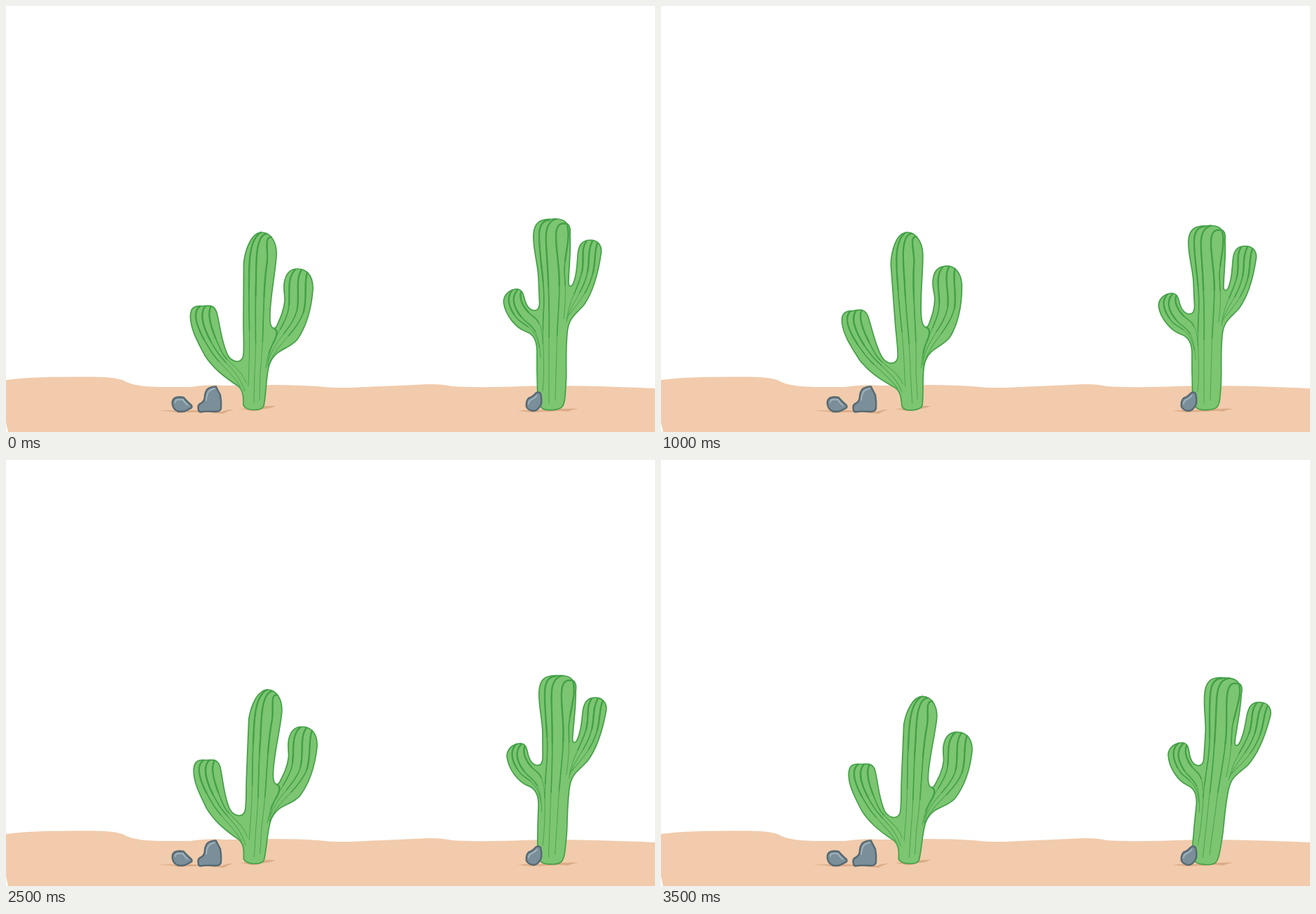
Recreate the animation shown at these times as an HTML page. Size 924 by 606 pixels, loop 4 s.

```html
<!DOCTYPE html>
<html lang="en">
<head>
<meta charset="utf-8">
<title>Desert cacti</title>
<style>
html, body { margin: 0; width: 100%; height: 100%; overflow: hidden; background: #fff; }
svg { display: block; width: 100%; height: 100%; }
.skin { fill: #7cc571; stroke: #43a047; stroke-width: 1.7; stroke-linejoin: round; }
.rib { fill: none; stroke: #43a047; stroke-linecap: round; }
.rock { fill: #7b8f9a; stroke: #566971; stroke-width: 2.4; stroke-linejoin: round; }
.shine { fill: none; stroke: #a9bbc3; stroke-width: 1.5; stroke-linecap: round; }
.shade { fill: #dcab87; }
</style>
</head>
<body>
<svg viewBox="0 0 924 606" preserveAspectRatio="none">
  <path fill="#f1cbac" d="M0 532C30 528 70 527.5 110 527.5C140 527.5 155 528 168 533C180 540 200 542.5 240 542L262 542Q290 538 310 540L380 539Q420 539 450 541.5Q470 544 500 542.5Q560 540 600 538Q620 537.5 635 541Q660 543 720 541.5Q770 539.5 820 540.5Q870 541.5 924 544V606H3L0 592Z"/>
  <path class="shade" d="M216 576Q232 574.5 246 576Q262 574 276 576Q296 575 308 577Q314 574 324 574Q316 576 310 580Q298 579 288 578Q264 577 246 579Q236 576 216 576Z"/>
  <path class="shade" d="M331 573Q345 572 356 573Q368 568 384 569Q376 573 364 573.5Q358 577 348 576Q342 574 331 573Z"/>
  <path class="shade" d="M728 576Q744 574 760 575Q782 572 796 573Q804 572 815 573Q806 574 800 577Q790 575 778 577Q762 577 748 578Q740 577 728 576Z"/>
  <g id="left"></g>
  <g id="right"></g>
  <path class="rock" d="M237 567Q236 559 242 557Q247 555.5 253 557Q256 561 264 568Q266 572 261 573Q255 577.5 249 577Q239 577 237 567Z"/>
  <path class="shine" d="M241 564Q241 560 245 560L252 560Q255 565 259 568"/>
  <path class="rock" d="M274 575Q272 567 278 565Q283 562 283 555Q284 546 289 543.5Q295 541 299 541.5Q302 548 305 553Q307 563 306 573Q304 577.5 297 577Q285 576 277 577.5Q275 577.5 274 575Z"/>
  <path class="shine" d="M285 561Q286 550 290 547L297 544"/>
  <path class="rock" d="M741 570Q740 562 744 558Q750 556 754 551Q758 548 761 551Q763 558 762 566Q758 575 752 576Q744 576 741 570Z"/>
  <path class="shine" d="M744 566Q744 562 748 560Q753 558 756 554"/>
</svg>
<script>
const STEP = 500;

const cacti = {
  left: {
    outline: 'M338 568C338 556 338 548 331 541C308 526 294 514 283 497C272 476 262.5 459 262.5 441C263 429 268 426 280 427C292 425 297 427 300 436C305 455 307 480 316 497C322 507 334 509 337.5 499C339.5 490 338 470 338 450L338.5 365C341 345 350 322 364 322C378 322 386 338 385 355C383 385 374 425 376 448C377 460 383 461 386 454C391 443 396 432 397 418C397 410 395 405 396 395C398 380 405 374 415 374C428 374 437 383 437 402C435 430 428 455 415 474C402 490 384 486 375 510C370 525 371 548 367 569Q365 574.5 353 574.5Q341 574.5 338 568Z',
    ribs: [
      'M363 322C346 332 346 365 346 395C345 430 348 470 346 510L345 540',
      'M371 324C356 326 356 360 356 390C354 440 357 480 354 520L353 565',
      'M378 329C366 328 375 350 371 370C365 410 368 470 362 520L361 560',
      'M276 427C262 438 276 466 290 488C302 508 322 522 334 542',
      'M284 427C272 440 286 470 300 491C312 510 330 518 340 548',
      'M292 427C284 440 296 468 306 490C314 508 334 514 342 536',
      'M412 375C398 388 406 412 402 432C398 455 379 470 373 505',
      'M421 375C411 390 419 412 414 434C406 462 379 476 372 512',
      'M429 379C424 392 429 412 424 434C414 466 386 478 373 512',
      'M382 459C389 462 384 474 379 482C374 492 372 500 370 515'
    ]
  },
  right: {
    outline: 'M762 571C755 560 757 540 756 520L756 490C755.5 474 750 466 740 463C726 458 711 440 708.5 422C708 412 715 404 727 402.5C734 403 736 408 737.5 414C740 425 745 432 751 433C758 434 760 428 759.5 420L758 385C757 365 750 345 751 325C752 308 760 303 778 303C788 302 795 305 798 309C803 311 804 316 803 325C804.5 350 801 375 801 393C801 399.5 804 400 807 396C812 385 813 370 814 355C815 340 820 333 832 333C843 333 848 341 847.5 350C844 375 837 405 823 425C810 440 801 443 799 465C796 500 799 520 797 540C796 560 795 567 791 571Q785 575 775 574.5Q766 575 762 571Z',
    ribs: [
      'M774 304C755 306 759 330 760 345C762 375 768 400 765 440C763 480 768 510 764 548',
      'M783 303C764 308 769 335 770 355C773 400 774 440 773 480L773 565',
      'M798 310C776 304 784 340 786 365C791 405 784 450 784 490L782 560',
      'M799 312C804 330 796 350 795 375C796 400 798 410 794 445',
      'M721 404C710 416 718 434 730 447C742 456 755 460 759 486',
      'M728 404C716 418 727 436 738 447C750 456 759 462 761 500',
      'M733 407C730 420 740 434 750 441C760 448 764 460 764 480',
      'M826 335C818 346 824 360 820 378C815 402 801 418 798 450',
      'M835 334C827 350 832 364 827 382C821 408 804 424 799 445',
      'M842 337C837 350 840 364 835 382C829 406 814 424 801 440'
    ]
  }
};

// One pose per step: lean in radians, squash as a share of the height
const poses = {
  left: {
    base: 575, pivot: [360, 507],
    lean: [0, -.048, -.08, -.03, .034, .034, .034, .034],
    squash: [0, 0, 0, 0, 0, .018, .036, .056],
    shift: [0, 0, 0, 0, 2.4, 2.4, 2.4, 2.4]
  },
  right: {
    base: 575, pivot: [766, 550],
    lean: [0, 0, 0, 0, 0, .036, .071, .104],
    squash: [0, .03, .035, .022, .011, .011, .012, .016],
    shift: [0, 0, 0, 0, 0, 0, 0, 0]
  }
};

function addPath(parent, cls, d, attrs = {}) {
  const el = document.createElementNS('http://www.w3.org/2000/svg', 'path');
  el.setAttribute('class', cls);
  el.setAttribute('d', d);
  for (const key in attrs) el.setAttribute(key, attrs[key]);
  parent.appendChild(el);
}

// Ribs thin out towards the foot
for (const id in cacti) {
  const group = document.getElementById(id);
  addPath(group, 'skin', cacti[id].outline);
  for (const d of cacti[id].ribs) {
    addPath(group, 'rib', d, { 'stroke-width': 1, 'stroke-opacity': .85 });
    addPath(group, 'rib', d, { 'stroke-width': 1.6, pathLength: 100, 'stroke-dasharray': '65 200' });
    addPath(group, 'rib', d, { 'stroke-width': 2.3, pathLength: 100, 'stroke-dasharray': '38 200' });
  }
}

function draw(time) {
  const i = Math.floor(time / STEP) % 8;
  for (const id in poses) {
    const { base, pivot, lean, squash, shift } = poses[id];
    const turn = lean[i] * 180 / Math.PI;
    document.getElementById(id).setAttribute('transform',
      `translate(${shift[i]} ${base}) scale(1 ${1 - squash[i]}) translate(0 ${-base}) rotate(${turn} ${pivot})`);
  }
}

const start = performance.now();
function tick() {
  draw(performance.now() - start);
  requestAnimationFrame(tick);
}
draw(0);
requestAnimationFrame(tick);
</script>
</body>
</html>
```
